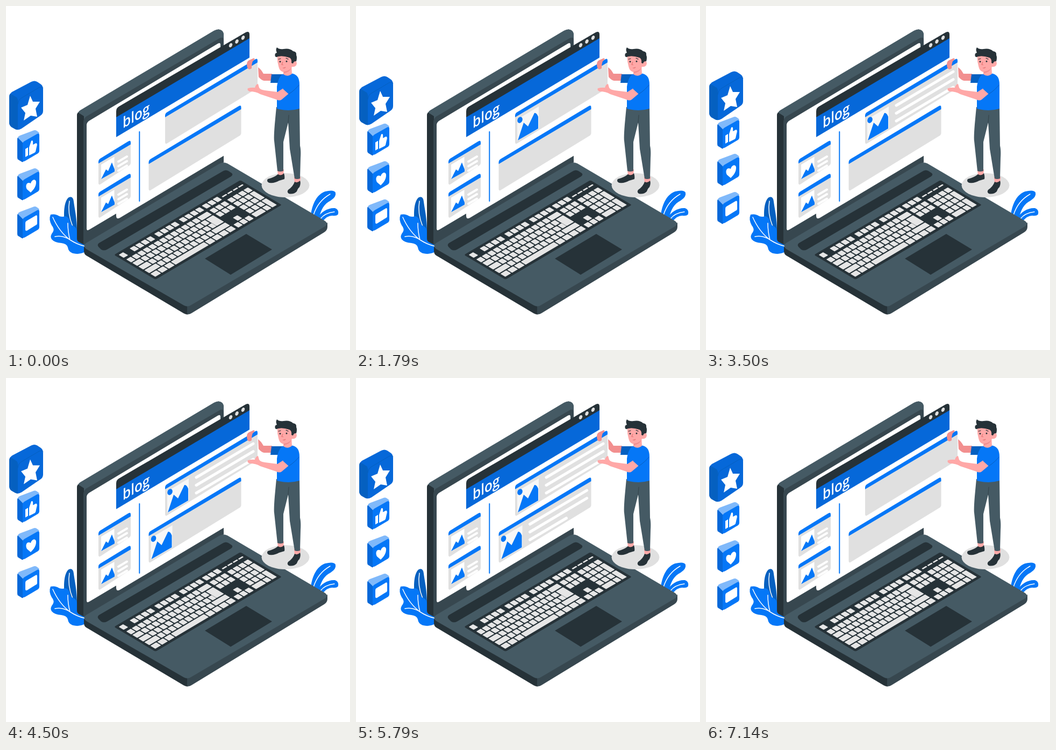
An HTML page that plays this animation: 640x640 px, repeating every 7.21 s.

```html
<!DOCTYPE html>
<html lang="en">
<head>
<meta charset="utf-8">
<title>Blog post</title>
<style>
html, body { margin: 0; width: 100%; height: 100%; overflow: hidden; background: #fff; }
svg { display: block; width: 100%; height: 100%; }
.blue { fill: #0577f7; } .mid { fill: #0668d9; } .deep { fill: #0560c0; }
.ink { fill: #263238; } .slate { fill: #37474f; } .steel { fill: #455a64; }
.grey { fill: #e0e0e0; } .white { fill: #fff; } .skin { fill: #ffa8a7; } .rose { fill: #f28f8f; }
.vein { fill: none; stroke: #fff; stroke-width: 1.5; stroke-linecap: round; }
.thin { fill: none; stroke: #263238; stroke-width: 1.2; stroke-linecap: round; }
.row { stroke: #fff; stroke-linecap: round; }
text { font: 600 28px "Open Sans", "Noto Sans", sans-serif; fill: #fff; }
</style>
</head>
<body>
<svg viewBox="0 0 640 640">
  <g id="leaves">
    <path class="deep" d="M110 408C106 387 108 362 117 356Q125 353 126 364C128 380 133 397 132 430L118 425Z"/>
    <path class="vein" d="M118 363Q114 385 124 410"/>
    <path class="blue" d="M83 388Q92 386 99 391Q105 393 111 391Q118 394 119 402Q120 408 127 410Q133 414 132 422Q133 428 140 432L150 444L146 458Q136 463 124 460Q116 457 115 449Q113 442 103 441Q90 440 85 434Q81 428 87 421Q91 415 85 408Q79 397 83 388Z"/>
    <path class="vein" d="M87 393Q99 420 119 435Q133 444 147 447M115 404Q115 420 119 435M91 429Q106 426 119 435"/>
    <path class="blue" d="M567 389C570 367 579 350 594 345Q610 341 613 347Q615 355 604 362C592 368 586 378 582 396Z"/>
    <path class="blue" d="M579 395C586 383 599 375 612 376Q620 379 618 387Q616 391 607 390Q597 390 589 401Z"/>
    <path class="vein" d="M572 389Q580 363 603 350M585 396Q593 385 611 383"/>
  </g>

  <g id="screen">
    <path class="steel" d="M132 206Q132 198 138 194L387 46Q396 41 402 46Q405 49 405 54V78L160 222L144 214Z"/>
    <path class="ink" d="M132 204Q132 200 134 198L145 205V444L137 440Q132 438 132 433Z"/>
    <path class="slate" d="M144 216Q144 209 150 205L397 60Q405 56 405 64V291L146 444H144Z"/>
    <path class="white" d="M150 222Q150 217 154 214L394 70Q399 67 399 72V271L155 416Q150 419 150 414Z"/>
    <path class="steel" d="M138 195L387 46Q396 41 402 46Q405 49 405 54V58Q402 57 397 60L150 205Z"/>
  </g>

  <g id="page">
    <path class="white" d="M205 196L453 56V250L212 394Q205 398 205 390Z"/>
    <path class="ink" d="M205 208V196Q205 190 210 187L446 49Q453 46 453 53V61Z"/>
    <path class="mid" d="M205 207L453 60V96L205 244Z"/>
    <g class="grey">
      <ellipse cx="418" cy="73" rx="2.8" ry="4.2" transform="rotate(25 418 73)"/>
      <ellipse cx="429.500" cy="66" rx="2.800" ry="4.200" transform="rotate(25 429.500 66)"/>
      <ellipse cx="441" cy="59" rx="2.8" ry="4.2" transform="rotate(25 441 59)"/>
    </g>
    <text transform="matrix(.87 -.51 0 1 217 228)">blog</text>
    <path d="M248.300 234V363" stroke="#0577f7" stroke-width="2" stroke-linecap="round"/>
    <g id="cards"></g>
  </g>

  <g id="base">
    <path class="ink" d="M145 448L338 556V574Q335 574 331 572L149 464Q145 461 145 456Z"/>
    <path class="slate" d="M337 556L598 403V411Q598 417 592 421L346 571Q342 574 337 574Z"/>
    <path class="steel" d="M149 441L396 294Q404 289 412 293L592 399Q602 405 592 411L345 556Q338 561 331 557L149 452Q142 446 149 441Z"/>
    <path class="ink" d="M173 441L404 307Q409 304 414 307L420 311Q423 314 419 317L188 453Q182 456 177 453L172 448Q169 444 173 441Z"/>
    <path class="ink" d="M370 470L447 424L495 453L418 500Z"/>
    <g id="keys" transform="matrix(.864 -.511 .866 .517 201 463)"></g>
  </g>

  <g id="man">
    <ellipse class="grey" cx="520" cy="333.500" rx="44.500" ry="22.500"/>
    <path class="skin" d="M505 304H517L516 317L506 318ZM536 318H548L547 331L537 332Z"/>
    <path class="ink" d="M506 313Q512 317 517 311Q519 317 518 322L508 325Q500 330 490 329Q484 327 487 322Q499 319 506 313ZM537 327Q542 330 547 325Q549 330 546 337Q543 339 541 345Q535 351 526 349Q522 346 525 342Q534 336 537 327Z"/>
    <path class="steel" d="M503 188H546L547 260Q549 268 548 283L547 321Q541 323 537 321L528 266L525 217L516 253L516 307Q510 309 505 307L499 251Q498 245 500 220Z"/>
    <path class="thin" d="M526 203L525 217" stroke-opacity=".5"/>
    <path class="rose" d="M469 114Q474 117 479 126L495 126L494 139H480Q475 138 470 132Z"/>
    <path class="deep" d="M494 127H516L512 143H492Z"/>
    <path class="blue" d="M514 127Q524 123 534 126Q546 129 546 146V191Q526 197 504 191V150Q506 134 514 127Z"/>
    <path class="skin" d="M516 112L531 108L532 126Q524 133 516 127Z"/>
    <path class="skin" d="M505 90Q517 84 533 92L534 102Q541 101 541 107Q540 114 532 113Q529 121 519 123Q509 123 507 112Q504 102 505 90Z"/>
    <path class="rose" d="M517 122Q526 121 531 115Q528 123 517 125Z"/>
    <path class="ink" d="M501 94Q499 88 504 87Q501 81 504 77Q508 81 516 80Q528 78 534 84Q541 85 540 91Q542 96 540 103Q536 102 534 107L531 106Q532 98 527 96Q515 92 506 94Q503 96 501 94Z"/>
    <circle class="ink" cx="510" cy="103.500" r="1.500"/><circle class="ink" cx="522" cy="103" r="1.500"/>
    <path class="thin" d="M507 99L511 98M521 97L525 99"/>
    <path d="M515 104L513 109L516 109.500M515 115Q518 116 520 114" fill="none" stroke="#e57373" stroke-width="1.200"/>
    <path class="skin" d="M450 153Q458 151 463 152Q465 145 469 145L471 152Q473 156 482 157L505 160L516 153L526 163L513 174Q509 177 503 174L473 164Q465 159 453 159Q448 157 450 153Z"/>
    <path class="blue" d="M515 154L526 164Q539 155 545 146L538 131Z"/>
    <path d="M526 164Q539 155 545 147" fill="none" stroke="#0560c0" stroke-width="1"/>
    <path class="rose" d="M449 115Q446 104 452 101L461 97Q465 98 459 103Q457 107 457 116Q452 120 449 115Z"/>
  </g>

  <g id="tiles">
    <g>
      <path class="mid" d="M6 170Q6 164 11 160L47 141Q53 138 58 141L64 145Q69 148 69 155V195Q69 201 64 204L29 228Q22 232 17 229L10 225Q6 222 6 216Z"/>
      <path class="deep" d="M6 170Q6 165 8 163L20 170Q23 174 22 181V230Q19 230 17 229L10 225Q6 222 6 216Z"/>
      <path d="M22 183Q23 174 29 171L61 152Q67 149 69 153" fill="none" stroke="#0560c0" stroke-width="1"/>
      <path class="white" d="M45 167L50 178L63 178L55 191L58 206L46 204L33 213L36 199L28 189L40 184Z"/>
    </g>
  </g>
</svg>
<script>
const LOOP = 7210, SLOPE = 0.593;
const $ = id => document.getElementById(id);

function add(parent, name, attrs) {
  const el = document.createElementNS("http://www.w3.org/2000/svg", name);
  for (const k in attrs) el.setAttribute(k, attrs[k]);
  return parent.appendChild(el);
}
const shape = (parent, cls, d) => add(parent, "path", { class: cls, d });

function card(x, y, w, h) {
  const g = add($("cards"), "g", {}), top = y - w * SLOPE, r = x + w;
  shape(g, "grey", `M${x} ${y + 5}L${r} ${top + 5}v${h - 11}q0 4-4 6L${x + 3} ${y + h - 1}q-3 1-3-3z`);
  shape(g, "blue", `M${x} ${y + 6}v-4q0-3 3-5L${r - 4} ${top}q4-2 4 2v4z`);
  return g;
}

function textRow(g, x, y, len, width) {
  return add(g, "line", { class: "row", "stroke-width": width, x1: x, y1: y, x2: x + len, y2: y - len * SLOPE });
}

function sideCard(y) {
  const g = card(172, y, 60, 46);
  shape(g, "white", `M177 ${y + 8}l24.500-14.500v27l-24.500 14.500z`);
  shape(g, "blue", `M177 ${y + 35}l9-18 4 3 7-16 5 13v4z`);
  for (let i = 0; i < 3; i++) textRow(g, 209, y + 2.5 + i * 8.5, 16, 4);
}

// Each post shows its picture at `start`, then writes three rows.
function post(x, y, start, rowTimes) {
  const g = card(x, y, 172, 56), pic = add(g, "g", {});
  pic.setAttribute("transform", `translate(${x - 296} ${y - 201})`);
  add(pic, "path", { fill: "#f7f7f7", d: "M300 211L340 187V228L300 251Z" });
  shape(pic, "blue", "M301 250L312 217L320 224L332 199Q336 198 339 206V228Z");
  add(pic, "ellipse", { class: "blue", cx: 305, cy: 212, rx: 4.5, ry: 6, transform: "rotate(25 305 212)" });
  const rows = [0, 1, 2].map(i => textRow(g, x + 58, y - 16 + i * 14.5, 106, 5));
  return t => {
    pic.setAttribute("opacity", ramp(t, start, start + 350));
    rows.forEach((row, i) => {
      const p = ramp(t, rowTimes[i], rowTimes[i + 1]), x1 = x + 58, y1 = y - 16 + i * 14.5;
      row.setAttribute("visibility", p > 0 ? "visible" : "hidden");
      row.setAttribute("x2", x1 + 106 * p);
      row.setAttribute("y2", y1 - 106 * p * SLOPE);
    });
  };
}

function tile(y, icon) {
  const g = add($("tiles"), "g", {}), box = add(g, "g", { transform: `translate(0 ${y})` });
  shape(box, "mid", "M21 17Q21 13 24 14L32 20V59Q30 60 28 58L23 55Q21 54 21 51Z");
  add(box, "path", { fill: "#80b9fa", d: "M22 14Q22 12 26 10L50 1Q54 -1 57 1L61 4Q63 6 59 9L32 24Z" });
  shape(box, "blue", "M31 26Q31 22 35 20L58 7Q62 5 62 9V38Q62 42 58 44L36 57Q31 60 31 55Z");
  shape(box, "white", icon);
  return g;
}

function buildKeys() {
  const U = 11.73, V = 12.95, pad = 4, g = $("keys");
  add(g, "rect", { class: "ink", width: 272, height: 89, rx: 3 });
  const key = (u, row, w = 1, h = 1) => add(g, "rect", {
    fill: "#e6e6e6", x: pad + u * U + 1, y: pad + row * V + 1, width: w * U - 2.1, height: h * V - 2.3, rx: 1
  });
  const run = (u, row, n) => { for (let i = 0; i < n; i++) key(u + i, row); };
  key(0, 0);
  [2, 6.5, 11].forEach(u => run(u, 0, 4));
  run(15.25, 0, 3);
  for (let i = 0; i < 4; i++) key(18.5 + i, 0.35, 1, 0.4);
  run(0, 1.25, 13); key(13, 1.25, 2);
  key(0, 2.25, 1.5); run(1.5, 2.25, 12); key(13.5, 2.25, 1.5, 2);
  key(0, 3.25, 1.75); run(1.75, 3.25, 11); key(12.75, 3.25, 0.9);
  key(0, 4.25, 2.25); run(2.25, 4.25, 10); key(12.25, 4.25, 2.75);
  for (let i = 0; i < 3; i++) key(i * 1.25, 5.25, 1.25);
  key(3.75, 5.25, 6.25);
  for (let i = 0; i < 4; i++) key(10 + i * 1.25, 5.25, 1.25);
  run(15.25, 1.25, 3); run(15.25, 2.25, 3);
  key(16.25, 4.25); run(15.25, 5.25, 3);
  run(18.5, 1.25, 4); run(18.5, 2.25, 3); run(18.5, 3.25, 3); run(18.5, 4.25, 3);
  key(21.5, 2.25, 1, 2); key(21.5, 4.25, 1, 2);
  key(18.5, 5.25, 2); key(20.5, 5.25);
}

const ramp = (t, a, b) => Math.min(1, Math.max(0, (t - a) / (b - a)));

sideCard(287);
sideCard(348.5);
const posts = [
  post(296, 201, 1450, [1930, 2490, 2970, 3450]),
  post(265.5, 288, 4000, [4530, 5010, 5490, 5960])
];
buildKeys();
const floats = [
  [$("tiles").firstElementChild, 18],
  [tile(231, "M36 35L41 32V47L36 50ZM43 32L47 20Q51 17 50 27L56 24Q59 25 57 31L55 40Q54 42 51 43L43 47Z"), 25],
  [tile(302, "M46 45L39 39C35 32 39 24 46 28C48 20 56 19 56 26C56 34 51 40 46 45Z"), 27],
  [tile(373, "M36 31Q36 28 38 27L55 17Q58 15 58 19V31Q58 34 55 35L39 45Q36 46 36 43Z"), 27]
];

function draw(t) {
  const lift = (1 - Math.cos(2 * Math.PI * t / LOOP)) / 2;
  for (const [el, amp] of floats) el.setAttribute("transform", `translate(0 ${-amp * lift})`);
  const shown = t < 7135 ? t : 0;
  posts.forEach(update => update(shown));
}

const began = performance.now();
function tick() {
  draw((performance.now() - began) % LOOP);
  requestAnimationFrame(tick);
}
draw(0);
requestAnimationFrame(tick);
</script>
</body>
</html>
```
